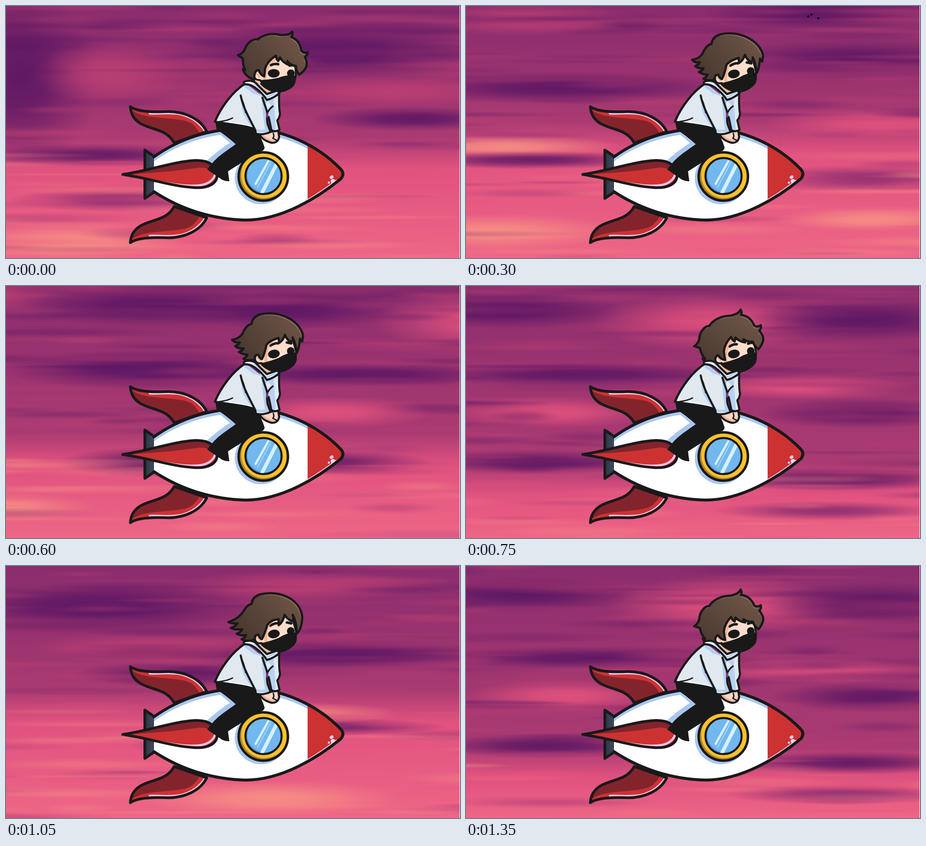
These frames come from a looping animation (1004x558 px, 1.5 s). An HTML page with a canvas:

```html
<!DOCTYPE html>
<html lang="en">
<head>
<meta charset="utf-8">
<title>Rocket ride</title>
<style>
html, body { margin: 0; width: 100%; height: 100%; overflow: hidden; background: #93306f; }
canvas { display: block; width: 1004px; height: 558px; }
</style>
</head>
<body>
<canvas id="stage" width="1004" height="558"></canvas>
<script>
const W = 1004, H = 558, STEP = 150, SCROLL = 525;
const ctx = document.getElementById('stage').getContext('2d');
const INK = '#191919', RED = '#cc3232', MAROON = '#83242d', PINK = '#f3bfe4', SHADE = '#a9c6f0';
const TONES = { d: '86,20,98', m: '190,64,114', p: '232,84,126', o: '247,146,132', v: '134,42,110' };

// ---- drawing helpers ----
const path = d => d instanceof Path2D ? d : new Path2D(d);

function fill(d, color) {
  ctx.fillStyle = color;
  ctx.fill(path(d));
}

function line(d, width = 5, color = INK) {
  ctx.strokeStyle = color;
  ctx.lineWidth = width;
  ctx.stroke(path(d));
}

function part(d, color, width, inside) {
  const p = path(d);
  fill(p, color);
  if (inside) {
    ctx.save();
    ctx.clip(p);
    inside(p);
    ctx.restore();
  }
  if (width) line(p, width);
}

function moved(x, y, draw) {
  ctx.save();
  ctx.translate(x, y);
  draw();
  ctx.restore();
}

function oval(x, y, rx, ry = rx, turn = 0) {
  const p = new Path2D();
  p.ellipse(x, y, rx, ry, turn, 0, 7);
  return p;
}

function ramp(x0, y0, x1, y1, ...colors) {
  const g = ctx.createLinearGradient(x0, y0, x1, y1);
  colors.forEach((c, i) => g.addColorStop(i / (colors.length - 1), c));
  return g;
}

// ---- sky ----
// Streaks: tone, x, y, half width, half height
const SKIES = {
  a: { horizon: 335, streaks: [
    ['d', 30, 160, 180, 200], ['d', 720, 100, 360, 62], ['m', 230, 150, 170, 70],
    ['m', 850, 190, 280, 34], ['d', 900, 250, 230, 28], ['d', 200, 330, 280, 26],
    ['v', 250, 430, 250, 26], ['o', 130, 525, 260, 42]] },
  b: { horizon: 300, streaks: [
    ['d', 790, 18, 270, 36], ['m', 120, 30, 270, 36], ['d', 210, 182, 390, 36],
    ['d', 860, 118, 320, 44], ['p', 920, 260, 260, 32], ['o', 80, 311, 270, 25],
    ['d', 150, 341, 300, 20], ['v', 880, 382, 290, 30], ['o', 60, 500, 290, 40],
    ['o', 900, 474, 220, 24]] },
  c: { horizon: 305, streaks: [
    ['d', 190, 14, 190, 32], ['m', 450, 20, 190, 42], ['d', 850, 45, 300, 45],
    ['m', 170, 120, 260, 34], ['d', 840, 185, 330, 45], ['o', 110, 308, 260, 22],
    ['d', 860, 390, 220, 34], ['o', 500, 490, 220, 34]] },
  d: { horizon: 438, streaks: [
    ['d', 90, 55, 270, 40], ['p', 540, 80, 260, 66], ['d', 880, 75, 250, 48],
    ['d', 250, 196, 380, 26], ['p', 740, 224, 260, 28], ['p', 190, 280, 230, 36],
    ['d', 880, 282, 240, 34], ['d', 150, 390, 270, 28], ['d', 820, 428, 280, 26],
    ['v', 800, 498, 260, 22]] }
};

function random(seed) {
  return () => (seed = seed * 16807 % 2147483647) / 2147483647;
}

function streak(tone, x, y, rx, ry, alpha) {
  const g = ctx.createRadialGradient(0, 0, 0, 0, 0, 1);
  [1, .85, .4, 0].forEach((a, i) => g.addColorStop(i / 3, `rgba(${TONES[tone]},${a * alpha})`));
  ctx.save();
  ctx.translate(x, y);
  ctx.scale(rx, ry);
  ctx.fillStyle = g;
  ctx.fillRect(-1, -1, 2, 2);
  ctx.restore();
}

function sky(layers, seed) {
  const horizon = layers.reduce((sum, l) => sum + SKIES[l[0]].horizon + (l[2] || 0), 0) / layers.length;
  const base = ctx.createLinearGradient(0, 0, 0, H);
  base.addColorStop(0, '#8a2d6d');
  base.addColorStop(.3, '#9a336f');
  base.addColorStop((horizon - 45) / H, '#aa3b72');
  base.addColorStop((horizon + 25) / H, '#e0527f');
  base.addColorStop(1, '#ee6686');
  ctx.fillStyle = base;
  ctx.fillRect(0, 0, W, H);

  for (const [name, dx = 0, dy = 0] of layers)
    for (const [tone, x, y, rx, ry] of SKIES[name].streaks)
      streak(tone, x + dx, y + dy, rx, ry, .85);

  const rnd = random(seed * 977 + 41);
  for (let i = 0; i < 130; i++) {
    const y = rnd() * H;
    const tones = y < horizon - 15 ? 'ddmmm' : 'ppovo';
    streak(tones[Math.floor(rnd() * 5)], rnd() * 1200 - 100, y,
      70 + rnd() * 200, 4 + rnd() * 11, .14 + rnd() * .22);
  }
}

// ---- rocket ----
const BODY = 'M327 334C385 293 450 272 530 271C612 271 690 309 740 361Q750 372 740 383C690 424 610 474 530 474C450 472 385 449 327 411';

function fin() {
  part('M275 223C290 234 325 235 352 234C395 232 430 250 444 278L372 303C355 272 325 276 297 260C280 249 276 236 275 223Z',
    RED, 6, () => {
      fill('M280 232C305 250 360 246 396 254Q420 260 432 290L372 310L270 270Z', MAROON);
      line('M318 238C345 239 365 235 388 240Q425 250 442 280', 5, PINK);
    });
}

function porthole() {
  fill(oval(564, 381, 58), SHADE);
  part(oval(569, 377.5, 54.5, 53.5), '#fbc02d', 5.5, () => {
    line('M519 350Q506 396 540 421Q570 440 606 420', 10, '#ad8a2a');
  });
  part(oval(569.5, 376.5, 40), '#72b7ee', 4.5, () => {
    line(oval(572, 374, 42), 7, '#5590d8');
    line('M580 344L552 394', 5, '#d3f1fb');
    line('M601 345L566 414', 8, '#d3f1fb');
    line('M586 346L556 402', 2, '#a7d9f7');
  });
}

function rocket() {
  fin();
  moved(0, 747, () => { ctx.scale(1, -1); fin(); });
  part('M307 319L329 334V411L307 426Z', ramp(307, 0, 328, 0, '#2c3443', '#414c60'), 6);
  part(BODY, SHADE, 0, p => {
    moved(0, 10, () => fill(p, '#fff'));
    ctx.fillStyle = '#fff';
    ctx.fillRect(327, 380, 340, 100);
    line('M470 274L504 304Q470 325 440 354', 11, SHADE);
    porthole();
    ctx.fillStyle = RED;
    ctx.fillRect(667, 260, 90, 220);
    line('M667 432Q704 410 730 389', 8, PINK);
    fill(oval(720, 379, 4.5, 3.5, -.5), '#fbc9e8');
    fill(oval(723, 388, 5, 5), '#fbd5ee');
    fill(oval(714, 391, 2.5), '#fbc9e8');
  });
  line(BODY, 6.5);
  part('M258 373C320 364 370 344 420 342C452 341 468 358 467 375C466 395 445 404 415 402C365 399 320 382 258 373Z',
    RED, 6, () => {
      fill('M258 373C330 370 390 364 425 358Q440 356 451 364L455 330H350Z', MAROON);
      line('M325 386C370 396 410 401 435 396Q458 390 463 372', 5, PINK);
    });
}

// ---- rider ----
const HAIR = {
  calm: 'M549 163C538 160 527 152 524 140L529 142Q523 130 524 116Q518 112 513 109Q523 106 528 96C533 82 545 72 557 74C567 64 588 59 606 64Q626 66 633 57Q635 63 631 69Q650 76 653 99Q660 106 667 102Q668 108 661 113Q668 128 663 137Q656 148 648 152Q641 142 641 133Q628 130 622 122L624 130Q611 124 606 114L602 122Q598 118 597 110Q578 122 573 138L571 156Q562 152 559 142Q548 142 549 163Z',
  windy: 'M550 163Q536 167 525 161Q533 157 534 152Q524 152 515 146Q524 143 525 138Q514 139 507 133Q516 129 517 125Q506 126 500 119Q520 116 526 99Q533 86 543 84Q545 68 562 63C600 53 650 74 657 110L655 123L650 117Q648 140 643 148Q640 124 634 114Q636 120 630 124Q620 118 617 108Q612 122 604 126L603 115Q584 120 576 130Q572 150 566 162Q560 160 558 152Q549 152 550 163Z',
  gusty: 'M550 163Q534 169 521 162Q530 158 531 153Q518 155 510 150Q521 146 522 140Q507 142 497 137Q509 133 512 127Q500 128 492 124Q516 116 526 99Q533 86 543 84Q545 68 562 63C600 53 650 70 655 112Q655 138 643 150Q643 124 634 108Q638 118 632 122Q622 118 616 108Q613 124 603 131L603 118Q588 118 578 130Q572 150 566 162Q560 160 558 152Q549 152 550 163Z'
};

function hair(style) {
  part(HAIR[style], '#8a6e5d', 5, p => {
    moved(-3, 4, () => fill(p, ramp(535, 150, 635, 70, '#4b3a31', '#5b463b', '#6b5244')));
  });
}

// Turns the forward-facing head back; the hair turns further than the face.
function tilted(degrees, x, y, draw) {
  moved(x, y, () => {
    ctx.rotate(-degrees * Math.PI / 180);
    ctx.translate(-575, -180);
    draw();
  });
}

function face() {
  part('M552 140Q543 165 562 164Q575 186 600 190Q640 188 641 150L638 118L590 105Z', '#fcdccb', 4, () => {
    line('M572 160Q574 130 600 114', 7, '#f5b796');
    line('M552 150Q558 150 560 158', 3, '#f0a988');
  });
  fill('M562 164Q585 163 602 159Q622 151 640 154Q644 172 631 182Q616 191 596 188Q576 183 562 164Z', INK);
  fill(oval(592, 149, 13, 9.5), INK);
  fill(oval(630, 149, 8.5, 8.5), INK);
}

function calmBrows() {
  line('M586 131Q594 127 602 129', 5.5);
  line('M627 132Q634 130 639 133', 5.5);
}

function windyBrows() {
  line('M585 132Q594 126 602 127', 5.5);
  line('M621 125L631 127', 5.5);
}

function head(pose) {
  fill('M550 156L606 182L600 196L577 204L552 176Z', '#f4bd9f');
  line('M564 172Q580 190 604 189', 4);
  if (pose === 'front') {
    face();
    calmBrows();
    hair('calm');
    return;
  }
  tilted(10, 581, 184, face);
  if (pose === 'calm') {
    tilted(10, 581, 184, calmBrows);
    tilted(15, 583, 186, () => hair('calm'));
  } else {
    windyBrows();
    hair(pose);
  }
}

function rider(pose) {
  fill('M463 258Q500 253 552 273Q566 292 572 314Q570 322 560 323Q536 330 521 347L491 366Q492 376 494 388Q482 389 471 380L445 362Q458 342 480 326L508 306Q486 286 466 274Z', INK);
  part('M559 282Q567 298 588 303Q602 303 604 290L602 276Z', '#fcd6c4', 4.5, () => {
    line('M566 286Q580 298 592 300', 4, '#f3b294');
  });
  line('M591 282Q594 289 590 293L598 297', 3);

  fill('M560 190L604 192L598 218L576 240Z', '#dfe9ef');
  part('M577 208L604 192C604 210 603 225 606 238Q605 248 600 253L605 274Q596 280 587 275L581 246C578 237 581 229 588 222Z',
    '#b9d2f2', 0, () => fill('M592 205L603 196L605 272L597 276Z', '#dfe9ef'));
  line('M604 192C604 210 603 225 606 238Q605 248 600 253L605 274Q596 280 587 275L581 246', 4.5);
  part('M530 171C500 190 475 225 462 256C485 262 520 262 548 272L566 276L577 245L577 208Z', '#dfe9ef', 0, () => {
    line('M534 176Q551 187 571 210', 14, '#b4cff2');
    line('M467 254Q502 257 545 269', 5, '#f7fbff');
    line('M528 205Q514 230 546 266', 5, '#b4cff2');
  });
  line('M530 171C500 190 475 225 462 256C485 262 520 262 548 272', 5);
  part('M522 199C524 222 538 250 551 274L553 283Q570 286 585 279L579 263C575 250 580 241 576 230L566 201Q543 188 522 199Z', '#dfe9ef', 0, () => {
    line('M570 205Q572 240 578 278', 9, '#b4cff2');
    line('M550 275Q568 279 584 274', 5, '#b4cff2');
  });
  line('M519 198C524 225 539 250 551 274L553 283Q570 286 585 279L579 263C575 250 580 241 576 230L567 203', 4.5);
  line('M523 210Q527 219 530 236', 3);
  line('M472 256Q489 254 501 248', 3);
  line('M577 238Q582 228 590 222', 4);
  fill('M577 235Q582 240 578 248Q574 242 577 235Z', '#a8326f');

  head(pose);
  part('M526 168Q540 162 552 170Q563 182 577 195L600 187L605 193Q592 204 577 208Q566 192 550 180Q540 173 526 173Z', '#e9f1f6', 4.5, () => {
    line('M549 172Q564 187 576 202L600 192', 3, '#b4cff2');
  });
}

// ---- timeline: pose and sky layers (name, dx, dy) ----
const STEPS = [
  ['front', ['a']],
  ['calm', ['a', -SCROLL], ['b', SCROLL]],
  ['windy', ['b']],
  ['gusty', ['c']],
  ['windy', ['c', -SCROLL], ['d', SCROLL]],
  ['calm', ['d']],
  ['windy', ['a', 40, -10]],
  ['gusty', ['a', -SCROLL, -10], ['b', SCROLL, 15]],
  ['windy', ['b', 20, 18]],
  ['calm', ['d', 30, 8]]
];
const SPECKS = { 2: [[757, 23], [764, 19], [779, 27]], 3: [[232, 19], [250, 23], [264, 30]] };

function draw(step) {
  const [pose, ...layers] = STEPS[step];
  ctx.lineCap = ctx.lineJoin = 'round';
  sky(layers, step + 1);
  for (const [x, y] of SPECKS[step] || []) fill(oval(x, y, 2.6), '#140b18');
  rocket();
  rider(pose);
  ctx.fillStyle = '#fff';
  ctx.fillRect(W - 1, 0, 1, H);
}

let shown = -1;
function tick() {
  const step = Math.floor(performance.now() / STEP) % STEPS.length;
  if (step !== shown) draw(shown = step);
  requestAnimationFrame(tick);
}
tick();
</script>
</body>
</html>
```
